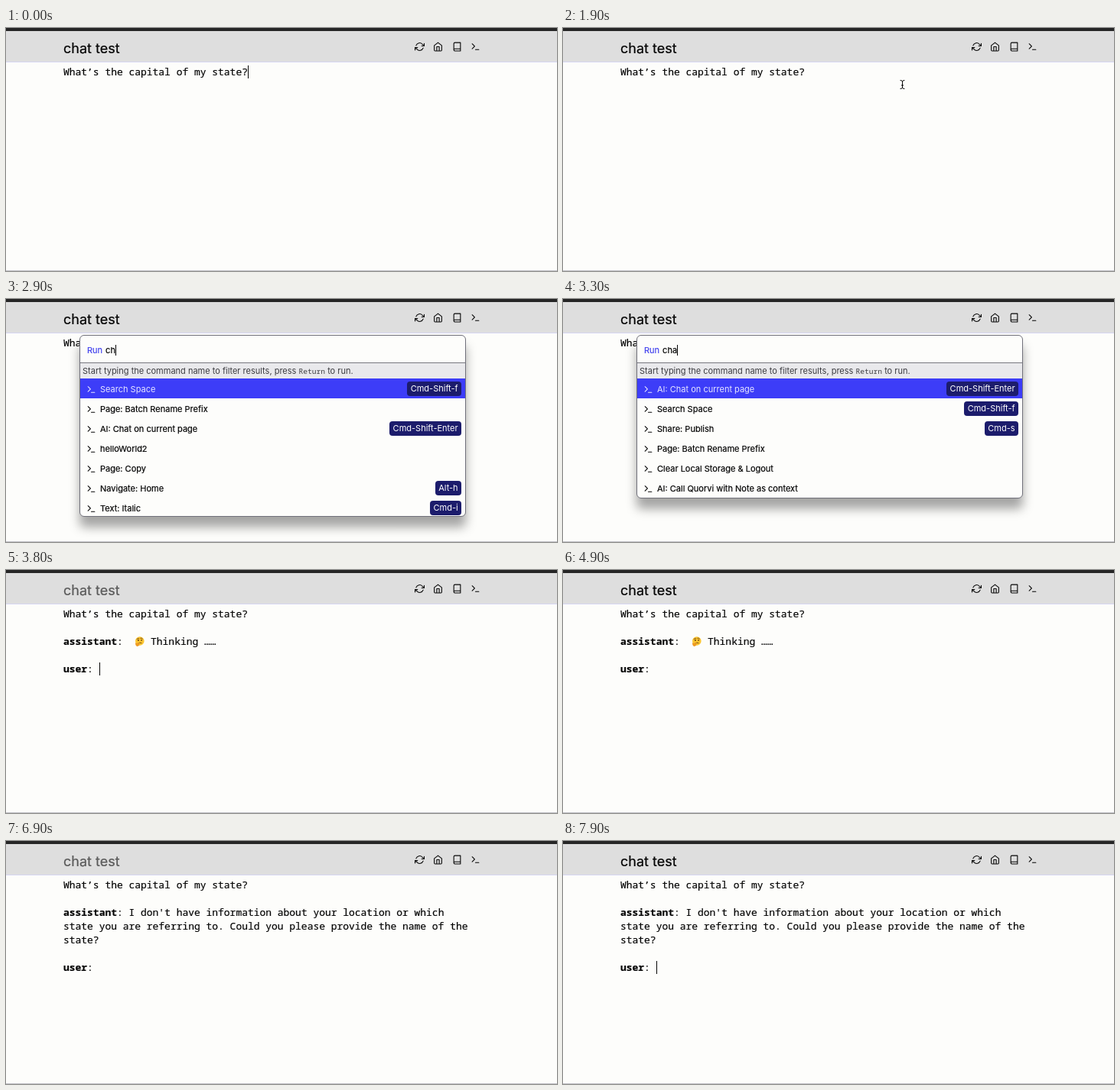
Animation, 720 px wide and 318 px high, one loop 8000 ms. Source, as an HTML page:

```html
<!DOCTYPE html>
<html lang="en">
<head>
<meta charset="utf-8">
<title>chat test</title>
<style>
  * { box-sizing: border-box; }
  html, body { margin: 0; width: 720px; height: 318px; overflow: hidden; background: #fdfdfb; }
  body { position: relative; color: #050505; font: 11px Inter, sans-serif; -webkit-text-stroke: .2px; }
  svg { fill: none; stroke: currentColor; stroke-width: 2; stroke-linecap: round; stroke-linejoin: round; }

  header {
    position: absolute; inset: 0 0 auto; height: 45px; background: #dedede;
    border-top: 4px solid #262626; border-bottom: 1px solid #d6d6f2;
  }
  h1 { position: absolute; left: 75px; top: 12.5px; margin: 0; font-size: 18px; font-weight: 400; line-height: 20px; }
  h1.unsaved { color: #5a5a5a; }
  header svg { position: absolute; top: 14px; width: 13px; height: 13px; }
  footer { position: absolute; inset: auto 0 0; height: 1px; background: #c3c3c8; }

  #doc {
    position: absolute; left: 75px; top: 48px; width: 540px;
    font: 500 12.96px/18px "Noto Sans Mono", monospace; white-space: pre-wrap;
  }
  .emoji { width: 13px; height: 13px; vertical-align: -2px; stroke: none; }
  .caret { position: absolute; width: 1px; height: 17px; margin-top: 1px; background: #050505; }
  #mouse { position: absolute; width: 7px; height: 12px; stroke-width: 1; }

  #palette {
    position: absolute; left: 96px; top: 47px; width: 505px; max-height: 238px; overflow: hidden;
    border: 1px solid #70707a; border-radius: 6px; background: #fdfdfb;
    box-shadow: 0 13.75px 13.75px rgba(0, 0, 0, .35);
  }
  .input { height: 36px; padding-left: 9px; line-height: 38px; border-bottom: 1px solid #77777f; white-space: pre; }
  .input b { font-weight: 400; color: #4444ee; margin-right: 4px; }
  .input .caret { height: 14px; margin-top: 12px; }
  .help {
    height: 20px; padding-left: 3px; line-height: 21px; background: #e9e9ec; color: #3c3c40;
    white-space: nowrap; -webkit-text-stroke: 0;
  }
  .help code { font: 9.6px "Noto Sans Mono", monospace; }
  .row { position: relative; height: 26px; padding-left: 26px; line-height: 28px; white-space: nowrap; }
  .row svg { position: absolute; left: 8px; top: 8px; width: 13px; height: 13px; }
  .row kbd {
    position: absolute; right: 5px; top: 4px; height: 19px; padding: 0 4.4px;
    border-radius: 4px; background: #1c1c6c; color: #fff; font: inherit; line-height: 19px;
    -webkit-text-stroke: 0;
  }
  .row:first-child { background: #3d3df8; color: #e6e6ff; -webkit-text-stroke: 0; }
  [hidden] { display: none !important; }
</style>
</head>
<body>
<svg width="0" height="0" style="position:absolute">
  <symbol id="prompt" viewBox="0 0 24 24"><path d="M4 17l6-6-6-6M12 19h8"/></symbol>
</svg>

<header>
  <h1 id="title">chat test</h1>
  <svg style="left:533.5px" viewBox="0 0 24 24"><path d="M23 4v6h-6M1 20v-6h6M3.5 9a9 9 0 0 1 14.9-3.4L23 10M1 14l4.6 4.4A9 9 0 0 0 20.5 15"/></svg>
  <svg style="left:558px" viewBox="0 0 24 24"><path d="M3 9l9-7 9 7v11a2 2 0 0 1-2 2H5a2 2 0 0 1-2-2zM9 22V12h6v10"/></svg>
  <svg style="left:582.5px" viewBox="0 0 24 24"><path d="M4 19.5A2.5 2.5 0 0 1 6.5 17H20M6.5 2H20v20H6.5A2.5 2.5 0 0 1 4 19.5v-15A2.5 2.5 0 0 1 6.5 2z"/></svg>
  <svg style="left:606.5px"><use href="#prompt"/></svg>
</header>

<div id="doc"></div>

<svg id="mouse" viewBox="0 0 7 12"><path d="M1 .5q2.5 0 2.5 1.5v8q0 1.5-2.5 1.5M6 .5q-2.5 0-2.5 1.5v8q0 1.5 2.5 1.5M2.3 7h2.4"/></svg>

<div id="palette">
  <div class="input"><b>Run</b><span id="query"></span><i class="caret" id="queryCaret"></i></div>
  <div class="help">Start typing the command name to filter results, press <code>Return</code> to run.</div>
  <div id="rows"></div>
</div>
<footer></footer>

<script>
const LOOP = 8000;
const $ = id => document.getElementById(id);

const QUESTION = "What’s the capital of my state?";
const ANSWER = ("I don't have information about your location or which state you are " +
  "referring to. Could you please provide the name of the state?").split(" ");
const THINKING = ` <svg class="emoji" viewBox="0 0 13 13">
  <circle cx="6.8" cy="6" r="5.8" fill="#fbc531"/>
  <path d="M3 3.4q1.3-1.5 2.8-.7M7.8 2.2q1.6-.6 2.6.7M5 8.6q2-.9 4-.1" fill="none" stroke="#6b4010" stroke-width=".9"/>
  <circle cx="4.9" cy="5" r=".9" fill="#5a3409"/><circle cx="9" cy="4.8" r=".9" fill="#5a3409"/>
  <path d="M1 8.6q1-1 1.6.4l3.6-1q1 .6-.3 1.2l.6 1.6q-.6 2-3 2.1-2.5-.3-2.5-4.3" fill="#ee9a22"/></svg> Thinking ……`;

// Commands as "name|shortcut"
const SEARCH = "Search Space|Cmd-Shift-f";
const CHAT = "AI: Chat on current page|Cmd-Shift-Enter";
const BATCH = "Page: Batch Rename Prefix";
const LISTS = {
  short: [SEARCH, BATCH, CHAT, "helloWorld2", "Page: Copy", "Navigate: Home|Alt-h", "Text: Italic|Cmd-i"],
  cha: [CHAT, SEARCH, "Share: Publish|Cmd-s", BATCH, "Clear Local Storage &amp; Logout",
    "AI: Call Quorvi with Note as context"]
};

const between = (t, a, b) => t >= a && t < b;
const caretOn = (t, start, half) => Math.floor((t - start) / half) % 2 === 0;
const caret = on => on ? '<i class="caret"></i>' : "";

function rowHtml(item) {
  const [name, key] = item.split("|");
  return `<div class="row"><svg><use href="#prompt"/></svg>${name}${key ? `<kbd>${key}</kbd>` : ""}</div>`;
}

function setHtml(el, html) {
  if (el.shown !== html) el.innerHTML = el.shown = html;
}

function docHtml(t) {
  if (t < 3800) return QUESTION + caret(t < 2000 && caretOn(t + 100, 0, 600));
  const words = Math.ceil((t - 5100) / 100 * 2.5);
  const reply = t < 5200 ? THINKING : ANSWER.slice(0, words).join(" ");
  return `${QUESTION}\n\n<b>assistant</b>: ${reply}\n\n<b>user</b>: ${caret(caretOn(t, 3800, 600))}`;
}

function renderPalette(t) {
  const open = between(t, 2000, 3600);
  $("palette").hidden = !open;
  if (!open) return;
  const typedAt = [2700, 2800, 3100].filter(at => t >= at);
  const query = "cha".slice(0, typedAt.length);
  setHtml($("query"), query);
  setHtml($("rows"), (LISTS[query] || LISTS.short).map(rowHtml).join(""));
  $("queryCaret").hidden = !caretOn(t, typedAt.pop() || 2000, 500);
}

function render(now) {
  const t = Math.floor(now % LOOP / 100) * 100;
  setHtml($("doc"), docHtml(t));
  $("title").classList.toggle("unsaved", between(t, 3800, 4800) || between(t, 5200, 7000));
  $("mouse").style.display = between(t, 1400, 2000) ? "" : "none";
  $("mouse").style.left = (t < 1500 ? 441.5 : 439.5) + "px";
  $("mouse").style.top = (t < 1500 ? 69 : 67.5) + "px";
  renderPalette(t);
}

const start = performance.now();
function tick() {
  render(performance.now() - start);
  requestAnimationFrame(tick);
}
tick();
</script>
</body>
</html>
```
